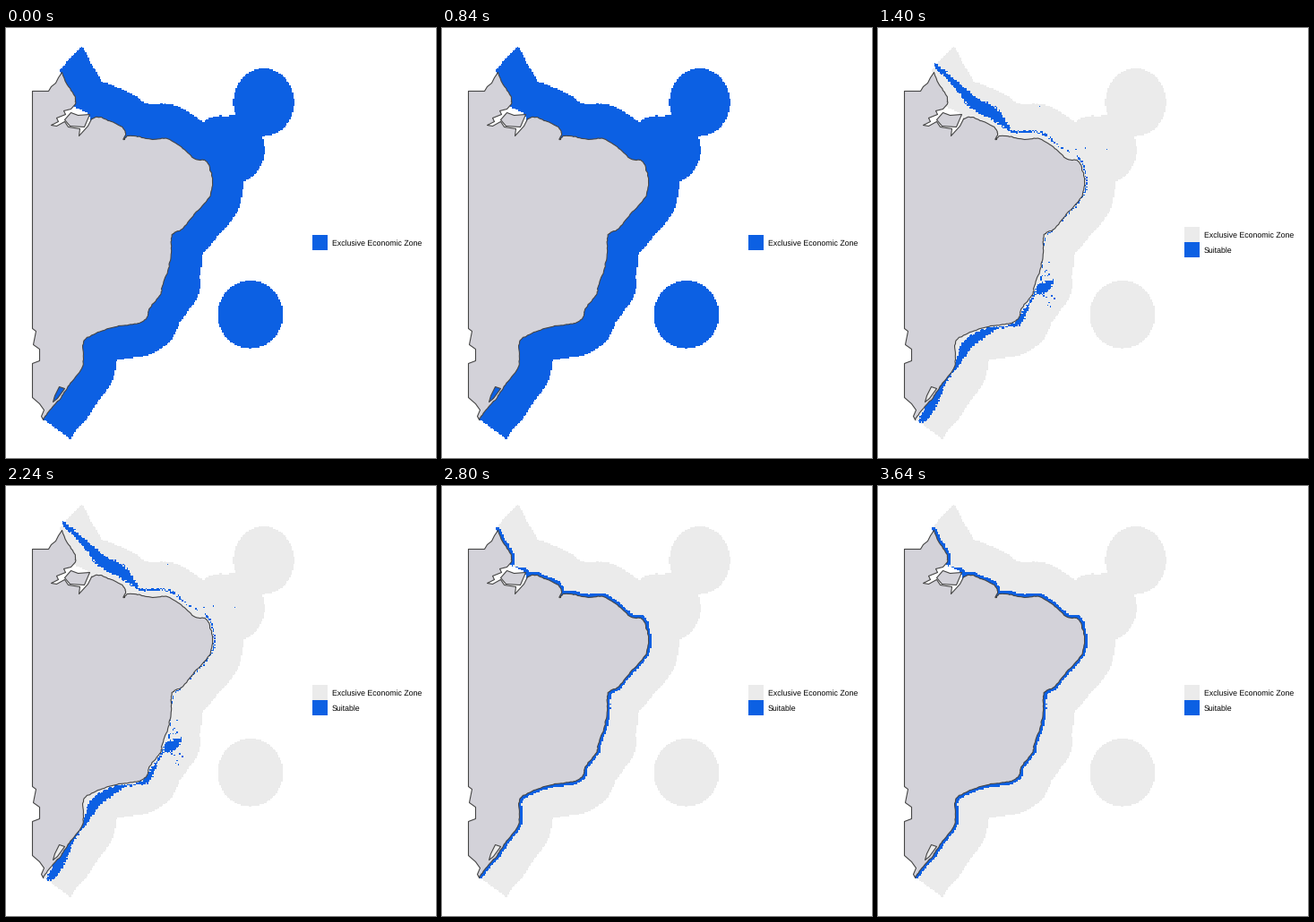
These frames come from a looping animation (480 px wide and 480 px high, 4.2 s). A matplotlib script:

```python
import matplotlib.pyplot as plt
import numpy as np
from matplotlib.animation import FuncAnimation
from matplotlib.colors import to_rgb
from matplotlib.patches import Polygon, Rectangle
from matplotlib.path import Path

SIZE = 480
CELL = 1.5
BLUE, PALE, LAND, EDGE = "#0c60e3", "#ebebeb", "#d3d2d9", "#454545"

# Key points of the land outline, clockwise
WEST = [(39, 433), (42, 426), (37, 419), (29, 412), (29, 374), (37, 371),
        (37, 358), (30, 353), (33, 338), (29, 335), (29, 70), (36, 70),
        (47, 70), (50, 65), (55, 61), (58, 55)]
NORTH = [(62, 49), (66, 59), (76, 75), (77, 84)]
MOUTH = [(72, 90), (64, 92), (66, 96), (56, 100), (58, 104), (50, 108),
         (56, 109), (65, 104), (69, 110), (82, 112), (81, 120), (91, 109)]
EAST = [(95, 101), (103, 99), (117, 104), (129, 110), (133, 117), (131, 124),
        (136, 120), (148, 121), (163, 124), (180, 123), (197, 134), (211, 146),
        (224, 149), (230, 170), (226, 189), (210, 207), (196, 224), (189, 227),
        (184, 233), (184, 250), (181, 268), (174, 287), (172, 297), (160, 312),
        (157, 323), (148, 329), (137, 331), (118, 334), (97, 342), (86, 350),
        (86, 368), (84, 380), (70, 398), (61, 412), (50, 424), (41, 437)]
DELTA = [(65, 102), (72, 94), (80, 97), (93, 96), (87, 110), (71, 109)]
LAGOON = [(52, 417), (54, 410), (59, 400), (65, 402), (57, 413)]

# Offshore islands that widen the zone, and the sea area it is clipped to
ISLES = [(288, 83), (254.5, 135.5), (240, 136), (273, 320), (181, 285)]
SEA = [(60, 47), (104, 0), (SIZE, 0), (SIZE, SIZE), (100, SIZE), (41, 436),
       (66, 395), (95, 104), (93, 96), (76, 88)]

# Suitable shelf as (x, y, half width)
SHELF = [(64, 41, 2), (93, 69, 4.5), (106, 83, 6.5), (128, 95, 6.8),
         (144, 110, 2.8), (151, 116, 1.2), (182, 117, 1.2), (203, 133, 0.8),
         (226, 147, 0.4), (233, 174, 0.9), (224, 195, 0.8), (187, 235, 0.8),
         (184, 265, 0.4), (181, 285, 0.8), (168, 310, 1.7), (157, 329, 3.4),
         (146, 333, 1), (132, 335, 1.5), (120, 340, 4), (100, 354, 6),
         (89, 374, 3), (71, 401, 2.8), (58, 426, 5.5), (47, 440, 2)]
BANK = [(179, 294, 3), (185, 290, 6), (197, 282, 1)]

axis = np.arange(CELL / 2, SIZE, CELL)
X, Y = np.meshgrid(axis, axis)
rng = np.random.default_rng(7)


def smooth(points, steps=8):
    """Catmull-Rom curve through the points."""
    p = np.array([points[0], *points, points[-1]], float)
    t = np.linspace(0, 1, steps, endpoint=False)[:, None]
    parts = [0.5 * (2 * b + (c - a) * t + (2 * a - 5 * b + 4 * c - d) * t**2
                    + (3 * b - a - 3 * c + d) * t**3)
             for a, b, c, d in zip(p, p[1:], p[2:], p[3:])]
    return np.vstack(parts + [p[-1:]])


def distance(points, rx=1, ry=1):
    """Distance of every cell to the nearest point, less that point's radius."""
    field = np.full(X.shape, np.inf)
    for x, y, *r in points:
        field = np.minimum(field, np.hypot((X - x) / rx, (Y - y) / ry) - sum(r))
    return field


def inside(points):
    cells = np.column_stack([X.ravel(), Y.ravel()])
    return Path(points).contains_points(cells).reshape(X.shape)


def shelf_mask():
    rough = rng.uniform(-1.3, 1, X.shape)
    strip = distance(np.vstack([smooth(SHELF, 24), smooth(BANK, 24)]))
    mask = strip < rough
    specks = np.vstack([rng.normal((190, 285), (3, 15), (20, 2)),
                        [(180, 88), (221, 135), (232, 134), (255, 135), (256, 136)]])
    cols, rows = (specks / CELL).astype(int).T
    mask[rows, cols] = True
    return mask


def paint(*layers):
    image = np.ones(X.shape + (3,))
    for mask, color in layers:
        image[mask] = to_rgb(color)
    return image


def rugged(points):
    curve = smooth(points)
    return curve + rng.normal(0, 0.3, curve.shape)


north, east = rugged(NORTH), rugged(EAST)
coast = np.vstack([north, smooth([(77, 84), (77, 92), (92, 95), (95, 101)]), east])

# The zone reaches a fixed distance from shore; degrees widen southwards
reach = distance(np.vstack([coast, ISLES]), 33 + 0.011 * Y, 37.8)
zone = (reach < 1) & inside(SEA)
shore = (distance(coast + 0.5) < 3.6) & zone
images = [paint((zone, BLUE)),
          paint((zone, PALE), (shelf_mask(), BLUE)),
          paint((zone, PALE), (shore, BLUE))]

plt.rcParams["text.hinting"] = "none"
fig = plt.figure(figsize=(SIZE / 72, SIZE / 72), dpi=72, facecolor="white")
ax = fig.add_axes([0, 0, 1, 1])
ax.set_xlim(0, SIZE)
ax.set_ylim(SIZE, 0)
ax.axis("off")


def shape(points, color):
    patch = Polygon(np.array(points) + 0.5, fc=color, ec=EDGE, lw=1.1,
                    joinstyle="round", zorder=2)
    return ax.add_patch(patch)


def legend_row(y, color, label):
    key = ax.add_patch(Rectangle((342, y), 17, 17, fc=color, lw=0, zorder=3))
    text = ax.text(364, y + 12, label, fontsize=8.8, family="Liberation Sans",
                   color="black", va="baseline")
    return [key, text]


raster = ax.imshow(images[0], extent=(0, SIZE, SIZE, 0), interpolation="nearest",
                   aspect="auto", zorder=1)
shape(np.vstack([WEST, north, MOUTH, east]), LAND)
shape(DELTA, LAND)
lagoon = shape(LAGOON, BLUE)
single = legend_row(231, BLUE, "Exclusive Economic Zone")
double = (legend_row(222, PALE, "Exclusive Economic Zone")
          + legend_row(239, BLUE, "Suitable"))


def update(i):
    raster.set_data(images[i])
    lagoon.set_facecolor(PALE if i else BLUE)
    for item in single:
        item.set_visible(i == 0)
    for item in double:
        item.set_visible(i > 0)
    return [raster, lagoon, *single, *double]


anim = FuncAnimation(fig, update, frames=3, interval=1400, repeat=True,
                     repeat_delay=0, blit=False)
plt.show()
```
